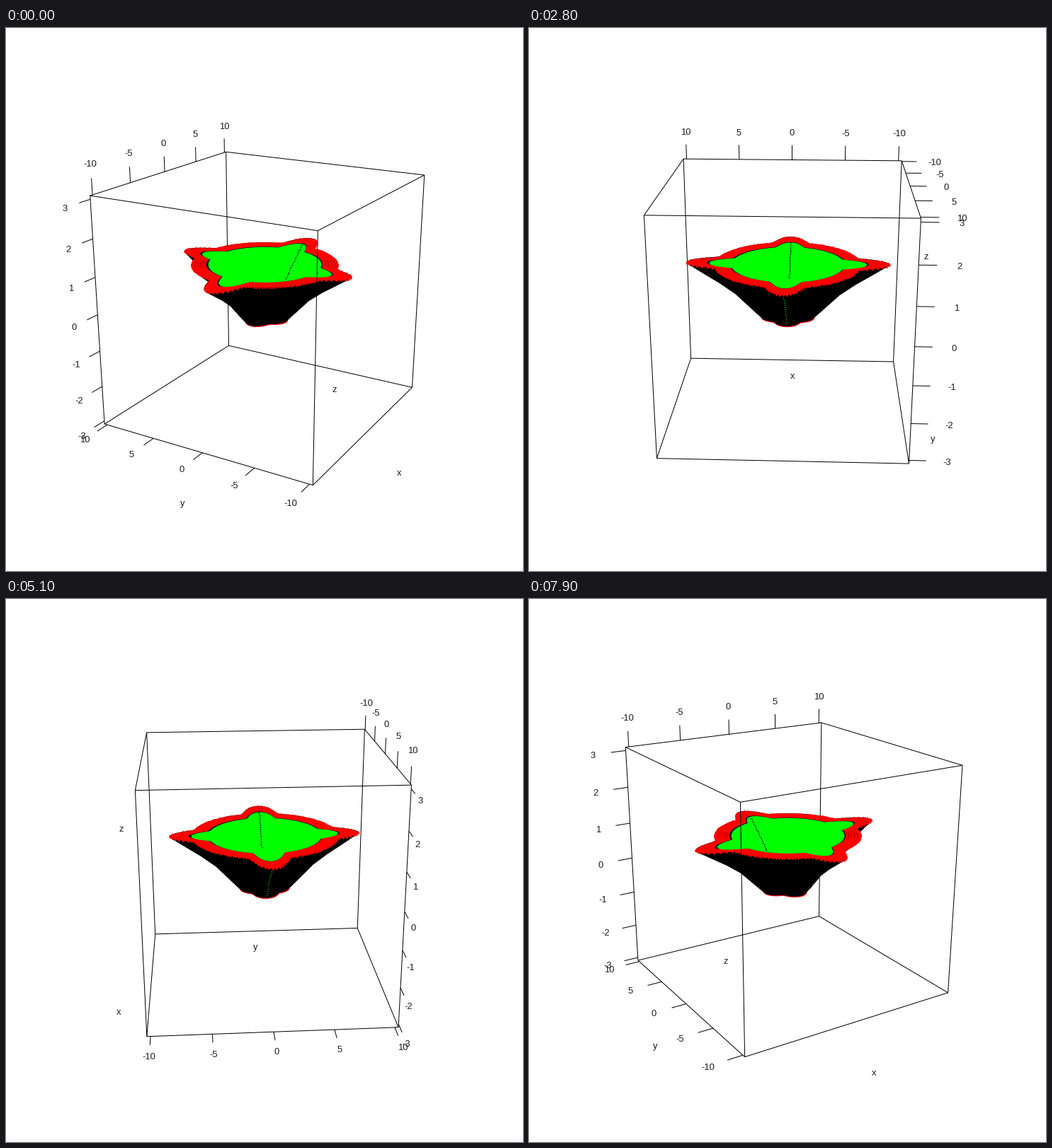
A matplotlib script for the animation above (8000 ms loop, 730 by 768 pixels).

```python
import numpy as np
import matplotlib.pyplot as plt
from matplotlib.animation import FuncAnimation
from matplotlib.collections import LineCollection, PolyCollection

W, H, DPI = 730, 768, 100
PX = 72 / DPI
FRAMES, INTERVAL = 80, 100
START, STEP = 15.0, 4.2            # degrees, degrees per frame
PITCH = np.radians(20)
CP, SP = np.cos(PITCH), np.sin(PITCH)
FOCAL, DIST = W / 2 / np.tan(np.radians(15)), 8.24
XY, Z = 10.3, 3.09                 # data units per half box
TICK, TITLE = 2 / 15, 1.3
LABEL_OUT, LABEL_UP = 0.295, 0.255  # label distance, sideways and upward
INNER = 0.8                        # inner rim / outer rim

fig = plt.figure(figsize=(W / DPI, H / DPI), dpi=DPI, facecolor="white")
ax = fig.add_axes([0, 0, 1, 1])
ax.set_xlim(0, W)
ax.set_ylim(H, 0)
ax.axis("off")


def project(p, a):
    """Box coordinates to pixels for a spin angle a."""
    p = np.asarray(p, float)
    x, y, v = p[..., 0], p[..., 1], p[..., 2]
    u = x * np.sin(a) + y * np.cos(a)
    w = x * np.cos(a) - y * np.sin(a)
    depth = DIST - w * CP - v * SP
    return np.stack([W / 2 + FOCAL * u / depth,
                     H / 2 - FOCAL * (v * CP - w * SP) / depth], -1)


def wrap(deg):
    return (deg + 180) % 360 - 180


def outline(ang, z=1.0):
    """Rim radius: a circle with four lobes that widen towards the base."""
    half = np.interp(z, [-0.5, 1.0], [45, 16])
    r = np.full(np.shape(ang), 6.3)
    for k, amp in enumerate((2.5, 1.9, 2.5, 1.9)):
        d = np.abs(wrap(np.degrees(ang) - 90 * k)) / half
        r = r + amp * np.cos(np.pi / 2 * np.minimum(d, 1)) ** 1.4
    return r


def widen(z):
    return np.interp(z, [-0.5, 0.2, 0.5, 1.0], [0.26, 0.53, 0.69, 1.0])


def ring(scale, z, ang):
    r = scale * widen(z) * outline(ang, z)
    return np.stack([r * np.cos(ang) / XY, r * np.sin(ang) / XY,
                     np.full_like(r, z / Z)], -1)


ang = np.linspace(0, 2 * np.pi, 361)[:-1]
body = np.array([ring(1, z, ang) for z in np.linspace(-0.5, 1.0, 31)])
rim = body[-1]
lip = ring(INNER, 1, ang)
bowl = ring(INNER * 0.965, 1, ang)
dots = rim[::2]

corners = [(-1, -1), (1, -1), (1, 1), (-1, 1)]
flat_edges = [[(*corners[i], v), (*corners[(i + 1) % 4], v)]
              for i in range(4) for v in (-1, 1)]
posts = [[(*c, -1), (*c, 1)] for c in corners]
titles = {"x": (0, -TITLE, -TITLE), "y": (-TITLE, 0, -TITLE),
          "z": (-TITLE, -TITLE, 0)}


def lines(zorder):
    c = LineCollection([], colors="black", linewidths=PX, zorder=zorder)
    return ax.add_collection(c)


def shape(color, zorder, edge="none", lw=0):
    c = PolyCollection([], facecolors=color, edgecolors=edge,
                       linewidths=lw * PX, zorder=zorder)
    return ax.add_collection(c)


def points(color, size, zorder):
    return ax.plot([], [], "o", color=color, ms=size * PX, mew=0,
                   zorder=zorder)[0]


back, front = lines(1), lines(9)
base = shape("red", 2, "red", 2.4)
wall = shape("black", 3, "black", 1)
rim_fill = shape("red", 4)
rim_dots = points("red", 2.8, 4.5)
grain = points("#5a0000", 1.0, 5)
lip_fill = shape("black", 5)
bowl_fill = shape("#00ff00", 6, "#00ff00", 1.4)
seam = points("black", 1.7, 7)
outer_seam = points("#00d800", 1.3, 7)


def label(s):
    return ax.text(0, 0, s, ha="center", va="baseline", color="#1c1c1c",
                   family="Liberation Sans", size=13 * PX, zorder=10)


xy_ticks = [-10, -5, 0, 5, 10]
z_ticks = range(-3, 4)
x_text = [label(str(t)) for t in xy_ticks]
y_text = [label(str(t)) for t in xy_ticks]
z_text = [label(str(t)) for t in z_ticks]
title_text = {k: label(k) for k in titles}


def tick_axes(a):
    """Choose the silhouette edges that carry the ticks."""
    reach = DIST * CP
    see_x = [s for s in (-1, 1) if reach * s * np.cos(a) > 1]
    see_y = [s for s in (-1, 1) if -reach * s * np.sin(a) > 1]
    right_x = 1 if np.sin(a) > 0 else -1
    right_y = 1 if np.cos(a) > 0 else -1
    ex = see_x[0] if see_x else right_x
    ey = -see_y[0] if see_y else right_y
    low = -1 if see_x else 1
    zy = ey if see_x else -ey
    up, out = np.array([0, 0, 1]), np.array([ex, 0, 0])
    yield x_text, [(t / XY, ey, 1) for t in xy_ticks], up, LABEL_UP
    yield y_text, [(ex, t / XY, low) for t in xy_ticks], out, LABEL_OUT
    yield z_text, [(ex, zy, t / Z) for t in z_ticks], out, LABEL_OUT


def place(text, pos):
    text.set_position((pos[0], pos[1] + 5))


def draw_box(a):
    near = [c[0] * np.cos(a) - c[1] * np.sin(a) > 0 for c in corners]
    ticks = []
    for texts, spots, out, gap in tick_axes(a):
        for text, p in zip(texts, np.array(spots, float)):
            ticks.append([p, p + TICK * out])
            place(text, project(p + gap * out, a))
    far_lines = flat_edges + ticks + [p for p, n in zip(posts, near) if not n]
    back.set_segments(list(project(far_lines, a)))
    front.set_segments(list(project([p for p, n in zip(posts, near) if n], a)))
    for k, p in titles.items():
        place(title_text[k], project(p, a))


def put(artist, pts, a):
    if len(pts):
        artist.set_data(*project(np.concatenate(pts), a).T)
    else:
        artist.set_data([], [])


def meridian(scale, z0, z1, n, lobe):
    return np.array([ring(scale, z, lobe) for z in np.linspace(z0, z1, n)])


def draw_seams(a):
    inner, outer = [], []
    for lobe in np.radians([0, 90, 180, 270]):
        view = abs(wrap(np.degrees(lobe + a)))
        if view > 140:
            inner.append(meridian(INNER, 1.0, 0.25, 19, lobe))
        if view < 8:
            outer.append(meridian(1, -0.4, 0.85, 13, lobe))
    put(seam, inner, a)
    put(outer_seam, outer, a)


def draw_grain(a):
    side = ang[::3]
    keep = (np.abs(np.sin(side + a)) > 0.985) & (outline(side) < 6.4)
    put(grain, [ring(s, 1, side[keep]) for s in (0.84, 0.88, 0.92, 0.96)], a)


def update(i):
    a = np.radians(START + STEP * i - 225)
    draw_box(a)
    layers = project(body, a)
    base.set_verts([layers[0]])
    wall.set_verts(list(layers))
    for artist, curve in ((rim_fill, rim), (lip_fill, lip), (bowl_fill, bowl)):
        artist.set_verts([project(curve, a)])
    rim_dots.set_data(*project(dots, a).T)
    draw_grain(a)
    draw_seams(a)
    return []


anim = FuncAnimation(fig, update, frames=FRAMES, interval=INTERVAL,
                     init_func=lambda: [], repeat=True, repeat_delay=0)
plt.show()
```
